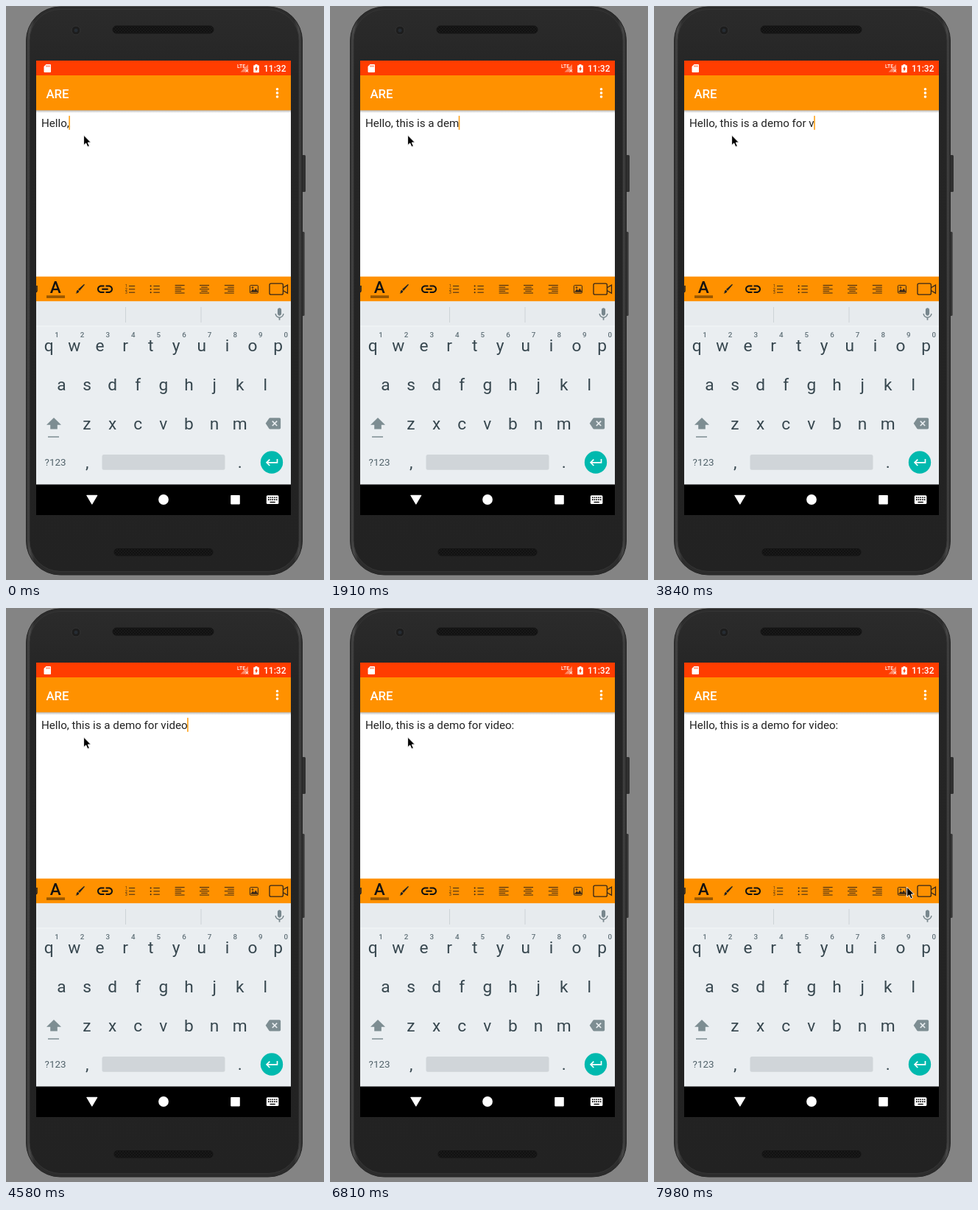
Animation of 432x778 px, one loop 8 s. Source, as an HTML page:

```html
<!DOCTYPE html>
<html lang="en">
<head>
<meta charset="utf-8">
<title>Rich text editor demo</title>
<style>
html, body { margin: 0; width: 100%; height: 100%; overflow: hidden; background: #848484; }
svg { display: block; width: 100vw; height: 100vh; font-family: Roboto, sans-serif; }
#line { white-space: pre; font-size: 15.15px; fill: #212121; }
.key { font-size: 22.7px; fill: #37474f; text-anchor: middle; }
.hint { font-size: 9.8px; font-weight: 500; fill: #607078; text-anchor: middle; }
.bold { font-weight: 500; fill: #fff; }
</style>
</head>
<body>
<svg viewBox="0 0 432 778">
  <defs>
    <linearGradient id="rim" x2="1" y2="0">
      <stop offset="0" stop-color="#303030"/><stop offset=".012" stop-color="#4a4a4a"/>
      <stop offset=".03" stop-color="#2c2c2c"/><stop offset=".97" stop-color="#2c2c2c"/>
      <stop offset=".988" stop-color="#484848"/><stop offset="1" stop-color="#2b2b2b"/>
    </linearGradient>
    <linearGradient id="face" x2="0" y2="1">
      <stop offset="0" stop-color="#2b2b2b"/><stop offset=".12" stop-color="#252525"/>
      <stop offset="1" stop-color="#222"/>
    </linearGradient>
    <linearGradient id="shade" x2="0" y2="1">
      <stop offset="0" stop-color="#000" stop-opacity=".3"/><stop offset="1" stop-color="#000" stop-opacity="0"/>
    </linearGradient>
    <pattern id="mesh" width="4" height="4" patternUnits="userSpaceOnUse">
      <rect width="4" height="4" fill="#191919"/>
      <circle cx="1" cy="1" r=".8" fill="#050505"/><circle cx="3" cy="3" r=".8" fill="#050505"/>
    </pattern>
    <clipPath id="screen"><rect x="41" y="74" width="346" height="616"/></clipPath>
  </defs>

  <!-- handset -->
  <rect width="432" height="778" fill="#848484"/>
  <rect x="402" y="202" width="5" height="50" rx="1.5" fill="#303030"/>
  <rect x="402" y="306" width="3.6" height="114" rx="1.5" fill="#363636"/>
  <rect x="27.5" y="1" width="375" height="770" rx="46" fill="url(#rim)" stroke="#262626"/>
  <rect x="32" y="4.5" width="366" height="762" rx="42" fill="url(#face)" stroke="#353535"/>
  <circle cx="95" cy="33" r="6" fill="#1d1d1d" stroke="#333"/>
  <circle cx="95" cy="33" r="2.5" fill="#262c33"/>
  <rect x="145" y="27" width="137" height="10" rx="5" fill="url(#mesh)" stroke="#151515"/>
  <rect x="147" y="735.5" width="134" height="9.5" rx="4.5" fill="url(#mesh)" stroke="#151515"/>

  <g clip-path="url(#screen)">
    <rect x="41" y="74" width="346" height="616" fill="#fff"/>
    <rect x="41" y="141" width="346" height="4" fill="url(#shade)"/>
    <rect x="41" y="74" width="346" height="20.5" fill="#ff3d00"/>
    <rect x="41" y="94" width="346" height="47.3" fill="#ff9100"/>

    <!-- status bar -->
    <path d="M54.5 79H60q1 0 1 1v9q0 1-1 1h-7.5q-1 0-1-1v-7z" fill="#fff"/>
    <path d="M55 80.5v2M57 80.5v2M59 80.5v2" stroke="#ff3d00"/>
    <text x="314" y="84" class="bold" font-size="6.8">LTE</text>
    <path d="M329 79v10.5h-10.5z" fill="#fff" opacity=".4"/>
    <path d="M325.7 86.2l3.3 3.3m0-3.3l-3.3 3.3" stroke="#fff"/>
    <path d="M338.5 79h3v1.2h1.6q.7 0 .7.7v8.6q0 .7-.7.7h-6.2q-.7 0-.7-.7v-8.6q0-.7.7-.7h1.6z" fill="#fff"/>
    <path d="M340.7 81.5l-2.6 4.2h1.4v3.2l2.5-4.3h-1.3z" fill="#ff3d00"/>
    <text x="350" y="88.7" class="bold" font-size="12">11:32</text>

    <!-- app bar -->
    <text x="54.4" y="124.7" class="bold" font-size="16.8">ARE</text>
    <g fill="#fff"><circle cx="368.5" cy="112.8" r="1.8"/><circle cx="368.5" cy="117.9" r="1.8"/><circle cx="368.5" cy="123" r="1.8"/></g>

    <!-- editor -->
    <text id="line" x="48" y="164"></text>
    <rect id="caret" width="1.6" height="19" fill="#ffa21a"/>

    <!-- format bar -->
    <rect x="41" y="366.7" width="346" height="34" fill="#ff9100"/>
    <path d="M42 379v7q0 1.5-2 2" fill="none" stroke="#222" stroke-width="1.6"/>
    <text x="67.3" y="389" font-size="22.5" font-weight="500" text-anchor="middle" fill="#111">A</text>
    <rect x="55" y="392.3" width="25" height="3.6" fill="#985600"/>
    <path d="M107 377.7l-7 8.2-2-1.8 8-7.2z" fill="#222"/>
    <path d="M97.4 384.8l2 1.8q-.8 3.2-4.8 3 1.8-1.2 1.2-3.1z" fill="#222"/>
    <path transform="translate(121.9 371.2) scale(1.05)" fill="#111" d="M3.9 12c0-1.71 1.39-3.1 3.1-3.1h4V7H7c-2.76 0-5 2.24-5 5s2.24 5 5 5h4v-1.9H7c-1.71 0-3.1-1.39-3.1-3.1zM8 13h8v-2H8zm9-6h-4v1.9h4c1.71 0 3.1 1.39 3.1 3.1s-1.39 3.1-3.1 3.1h-4V17h4c2.76 0 5-2.24 5-5s-2.24-5-5-5z"/>
    <g id="tools" stroke="#33261a" fill="none">
      <rect x="331.4" y="378.6" width="11" height="10.6" rx="1"/>
      <path d="M332.5 387.5l2.8-3.6 2 2 2-3 2.6 4.6z" fill="#33261a" stroke-width=".6"/>
      <circle cx="335" cy="381.6" r=".9"/>
      <rect x="358" y="376.2" width="18.4" height="15" rx="2" stroke-width="1.3"/>
      <path d="M376.5 381.7l6-3.6v11.2l-6-3.6" stroke-width="1.3"/>
    </g>

    <!-- keyboard -->
    <rect x="41" y="400.5" width="346" height="248" fill="#eaeef1"/>
    <rect x="41" y="400.5" width="346" height="33" fill="#e7ebee"/>
    <path d="M41 434h346" stroke="#f3f6f7"/>
    <path d="M162.5 408v21M265 408v21" stroke="#ccd3d7"/>
    <path transform="translate(361.2 407.6) scale(.86)" fill="#78878d" d="M12 14c1.66 0 3-1.34 3-3V5c0-1.66-1.34-3-3-3S9 3.34 9 5v6c0 1.66 1.34 3 3 3zm5.3-3c0 3-2.54 5.1-5.3 5.1S6.7 14 6.7 11H5c0 3.41 2.72 6.23 6 6.72V21h2v-3.28c3.28-.48 6-3.3 6-6.72z"/>
    <g id="keys"></g>
    <path d="M65 558l10 9.7h-5.2v5.8h-9.6v-5.8H55zM57 583.2h15v1.6H57z" fill="#7d8d92"/>
    <path transform="translate(352.7 555.6) scale(.85)" fill="#7d8d92" d="M22 3H7c-.69 0-1.23.35-1.59.88L0 12l5.41 8.11c.36.53.9.89 1.59.89h15c1.1 0 2-.9 2-2V5c0-1.1-.9-2-2-2z"/>
    <path d="M361.8 562.6l6.4 6.4m0-6.4l-6.4 6.4" stroke="#eaeef1" stroke-width="1.6"/>
    <text x="67" y="623" font-size="13.4" text-anchor="middle" fill="#51626a">?123</text>
    <rect x="130.5" y="608" width="167" height="20.7" rx="2.5" fill="#d0d5d9"/>
    <circle cx="361" cy="618.5" r="15.2" fill="#00b9ae"/>
    <path d="M368.5 614v4.8h-14.2m4-4.2l-4.2 4.2 4.2 4.2" fill="none" stroke="#fff" stroke-width="1.7"/>

    <!-- navigation -->
    <rect x="41" y="648.5" width="346" height="42" fill="#000"/>
    <path d="M109.7 663.3h14.2l-7.1 12z" fill="#fff" stroke="#fff" stroke-linejoin="round"/>
    <circle cx="214" cy="669" r="6.9" fill="#fff"/>
    <rect x="305.2" y="663" width="12.6" height="12.4" rx=".8" fill="#fff"/>
    <rect x="353.8" y="663.2" width="16.6" height="11.8" rx="1.5" fill="#fff"/>
    <path d="M356 666.3h12.5M356 669.1h12.5" stroke="#000" stroke-width="1.6" stroke-dasharray="1.6 1.1"/>
    <path d="M358.5 672.5h7.3" stroke="#000" stroke-width="1.4"/>
  </g>

  <path id="mouse" d="M.6.6v13.6l3.1-2.8 2.2 5 2.4-1-2.1-4.9h4.2z" fill="#000" stroke="#fff" stroke-width=".9"/>
</svg>
<script>
const $ = id => document.getElementById(id);
const LOOP = 8000, PITCH = 34.6;

// Static key labels
const label = (cls, x, y, s) => `<text class="${cls}" x="${x}" y="${y}">${s}</text>`;
const row = (cls, x, y, chars) =>
  [...chars].map((c, i) => label(cls, x + i * PITCH, y, c)).join('');
$('keys').innerHTML =
  row('key', 58.2, 468, 'qwertyuiop') + row('hint', 69, 449, '1234567890') +
  row('key', 75.5, 521, 'asdfghjkl') + row('key', 110, 573.5, 'zxcvbnm') +
  label('key', 110.3, 626, ',') + label('key', 317.8, 626, '.');

// List and alignment icons
const rule = (x, y, w) => `M${x} ${y}h${w}`;
const stroke = (d, extra = '') => `<path d="${d}" ${extra}/>`;
const rows = [0, 1, 2].map(i => 379.6 + i * 4.3);
let icons = '';
rows.forEach((y, i) => {
  icons += stroke(rule(167, y, 8.2) + rule(200.4, y, 8.4));
  icons += `<circle cx="196.6" cy="${y}" r="1" fill="#33261a" stroke="none"/>`;
  icons += `<text x="162" y="${y + 1.8}" font-size="5" fill="#33261a" stroke="none">${i + 1}</text>`;
});
[[229.6, 0], [263, .5], [296.8, 1]].forEach(([x, align]) => {
  for (let i = 0; i < 5; i++) {
    const w = i % 2 ? 8.6 : 13;
    icons += stroke(rule(x + (13 - w) * align, 378.6 + i * 2.6, w));
  }
});
$('tools').innerHTML += icons;

// [time, typed text]
const typing = [
  [0, 'Hello,'], [140, 'Hello, t'], [290, 'Hello, th'], [440, 'Hello, this'],
  [590, 'Hello, this '], [730, 'Hello, this i'], [880, 'Hello, this is '],
  [1170, 'Hello, this is a '], [1320, 'Hello, this is a d'], [1610, 'Hello, this is a de'],
  [1910, 'Hello, this is a dem'], [2060, 'Hello, this is a demo '],
  [2210, 'Hello, this is a demo f'], [2510, 'Hello, this is a demo fr'],
  [2650, 'Hello, this is a demo fro'], [2950, 'Hello, this is a demo fr'],
  [3100, 'Hello, this is a demo f'], [3240, 'Hello, this is a demo for'],
  [3390, 'Hello, this is a demo for '], [3840, 'Hello, this is a demo for v'],
  [4140, 'Hello, this is a demo for vi'], [4290, 'Hello, this is a demo for vid'],
  [4430, 'Hello, this is a demo for vide'], [4580, 'Hello, this is a demo for video'],
  [6070, 'Hello, this is a demo for video:']
];
const NEWLINE = 6360;
const blink = [[0, 1], [5030, 0], [5620, 1], [6810, 0], [7400, 1], [7840, 0]];
const pointer = [
  [0, [105, 174.5]], [7100, [168, 247]], [7250, [268, 362]], [7400, [323, 406.5]],
  [7550, [336, 399]], [7690, [346, 389]], [7840, [351, 381]], [7980, [343, 377.5]]
];
const at = (steps, t) => steps.findLast(([start]) => start <= t)[1];

function draw(now) {
  const t = now % LOOP, line = $('line'), caret = $('caret'), text = at(typing, t);
  if (line.textContent !== text) line.textContent = text;
  const below = t >= NEWLINE;
  caret.setAttribute('x', below ? 47.8 : 47.5 + line.getComputedTextLength());
  caret.setAttribute('y', below ? 167.3 : 148.8);
  caret.setAttribute('opacity', at(blink, t));
  $('mouse').setAttribute('transform', `translate(${at(pointer, t)})`);
}

const begin = performance.now();
function tick() {
  draw(performance.now() - begin);
  requestAnimationFrame(tick);
}
tick();
</script>
</body>
</html>
```
